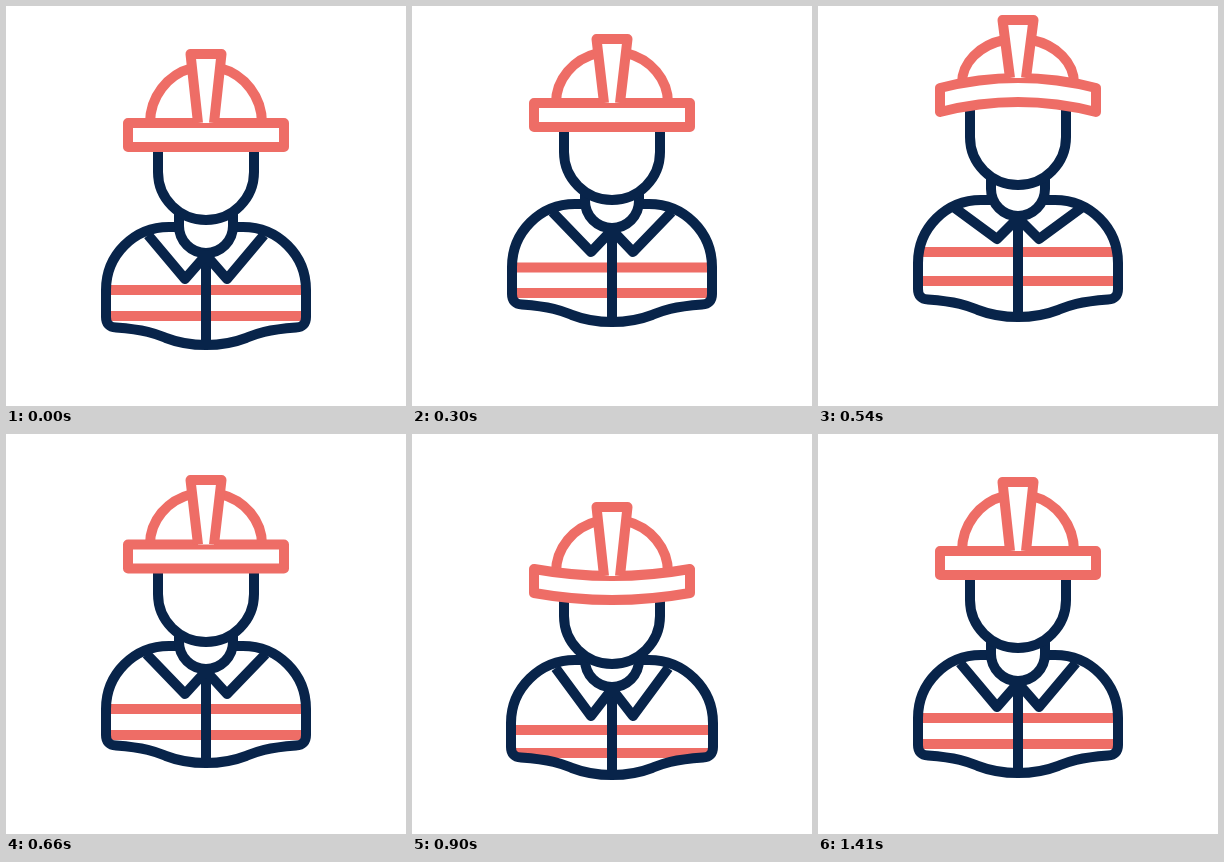
An HTML page that plays this animation: 400 px wide and 400 px high, repeating every 3440 ms.

```html
<!DOCTYPE html>
<html lang="en">
<head>
<meta charset="utf-8">
<title>Hopping builder</title>
<style>
html, body { margin: 0; height: 100%; overflow: hidden; background: #fff; }
svg { display: block; width: 100vw; height: 100vh; }
path { fill: none; stroke: #08244a; stroke-width: 10; stroke-linejoin: round; }
.coral { stroke: #ee6d66; }
.solid { fill: #fff; }
</style>
</head>
<body>
<svg viewBox="0 0 400 400">
  <path id="stripes" class="coral"/>
  <path id="body"/>
  <path id="neck"/>
  <path id="collar"/>
  <path id="face"/>
  <path id="dome" class="coral"/>
  <path id="brim" class="coral solid"/>
  <path id="ridge" class="coral solid"/>
</svg>
<script>
const LOOP = 3440, STEP = 30;
const rest = time => [time, 0, 0, 0, 0, 0, 0, 0, 0, 0, 0, 0];

// time, then offsets: ridge, brim, brim bend, face, shoulder, hem, neck, collar tip, stripes, widening
const poses = [
  rest(0),
  [150, 30, 22, -8, 19, 10, 8, 12, 16, 16, 14, 2],
  [300, -15, -20, 0, -20, -23, -23, -25, -27, -22.5, -23, 0],
  [480, -41, -40, 11, -39, -33, -33, -39, -43, -40, -38, 0],
  [540, -34, -35, 10, -35, -27, -28, -37, -40, -38, -35, 0],
  [660, -2, -6.5, 0, -6, -9, -10, -12, -13, -9, -9, 0],
  [780, 33, 24, -8, 22, 10, 8, 11, 16, 17, 14, 3],
  [900, 25, 18, -7, 16, 5, 2, 6, 9, 12, 9, 1],
  [1080, -2, -2, 0, -2, -2, -2, -5, -2, -2, -2, 0],
  [1230, 2, 2, 0, 2, 2, 2, 2, 2, 2, 2, 0],
  rest(1410)
];

const slope = (i, c) =>
  (poses[i + 1][c] - poses[i][c]) / (poses[i + 1][0] - poses[i][0]);

// Tangent that never overshoots a pose
function tangent(i, c) {
  if (i === 0 || i === poses.length - 1) return 0;
  const a = slope(i - 1, c), b = slope(i, c);
  return a * b > 0 ? 2 * a * b / (a + b) : 0;
}

function poseAt(t) {
  const last = poses.length - 1;
  if (t >= poses[last][0]) return poses[last].slice(1);
  const i = poses.findIndex(p => p[0] > t) - 1;
  const from = poses[i], to = poses[i + 1];
  const span = to[0] - from[0], u = (t - from[0]) / span, v = 1 - u;
  return from.slice(1).map((value, k) => {
    const c = k + 1;
    return v * v * (1 + 2 * u) * value + u * u * (3 - 2 * u) * to[c]
      + span * u * v * (v * tangent(i, c) - u * tangent(i + 1, c));
  });
}

const set = (id, d) => document.getElementById(id).setAttribute("d", d);

function draw(t) {
  const [ridge, brim, bend, face, shoulder, hem, neck, tip, upper, lower, wide] = poseAt(t);
  const left = 100 - wide, right = 300 + wide;

  set("stripes", `M${left + 4} ${284 + upper}H${right - 4}M${left + 4} ${310 + lower}H${right - 4}`);

  const s = 221 + shoulder, h = 339 + hem, n = 247 + neck;
  set("body", `M173 ${s}H163C128 ${s} ${left} ${s + 28} ${left} ${s + 63}V${h - 28}
    Q${left} ${h - 18} ${left + 10} ${h - 17.5}C142 ${h - 15} 150 ${h - 11} 160 ${h - 7}
    Q178 ${h} 200 ${h}Q222 ${h} 240 ${h - 7}
    C250 ${h - 11} 258 ${h - 15} ${right - 10} ${h - 17.5}Q${right} ${h - 18} ${right} ${h - 28}
    V${s + 63}C${right} ${s + 28} 272 ${s} 237 ${s}H227M200 ${n}V${h}`);

  set("neck", `M173 ${205 + face}V${n - 27}A27 27 0 0 0 227 ${n - 27}V${205 + face}`);

  const spread = 58 - (tip - shoulder) * 0.4, tipY = 273 + tip;
  set("collar", `M${200 - spread} ${s + 8}L179 ${tipY}L200 ${n + 2}L221 ${tipY}L${200 + spread} ${s + 8}`);

  const chin = 166 + face, top = 141 + brim - bend * 0.62;
  set("face", `M152 ${top}V${chin}A48 48 0 0 0 248 ${chin}V${top}`);

  const base = 117 + brim - bend * 0.48;
  const join = 62 + ridge + Math.max(0, bend) * 0.6;
  const arc = `A56 ${(base - join) / 0.968} 0 0`;
  set("dome", `M144 ${base}${arc} 1 186 ${join}M256 ${base}${arc} 0 214 ${join}`);

  const b = 117 + brim;
  set("brim", `M122 ${b}Q200 ${b - 2 * bend} 278 ${b}V${b + 24}Q200 ${b + 24 - 2 * bend} 122 ${b + 24}Z`);

  const foot = b - bend, r = 48 + ridge;
  set("ridge", `M192 ${foot}L184.5 ${r}H215.5L208 ${foot}`);
}

function frame(now) {
  draw(Math.floor(now % LOOP / STEP) * STEP);
  requestAnimationFrame(frame);
}
draw(0);
requestAnimationFrame(frame);
</script>
</body>
</html>
```
